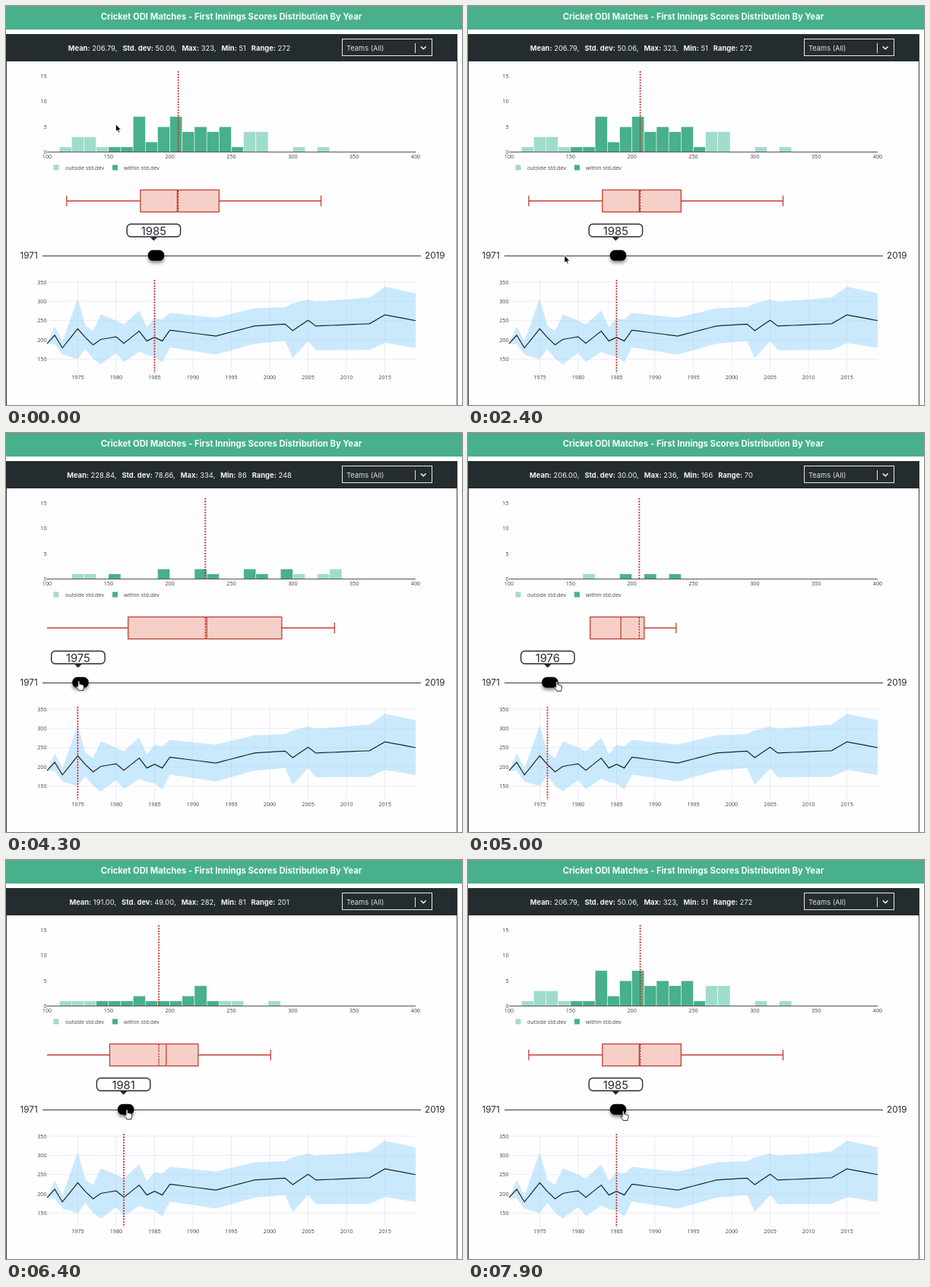
Animation of 600x526 px, one loop 8 s. Source, as an HTML page:

```html
<!DOCTYPE html>
<html lang="en">
<head>
<meta charset="utf-8">
<title>Cricket ODI Matches</title>
<style>
html, body { margin: 0; width: 100%; height: 100%; overflow: hidden; background: #fff; }
svg { display: block; width: 600px; height: 526px; font-family: Inter, Roboto, sans-serif; }
.axis { font: 7.2px "Open Sans", "Noto Sans", sans-serif; fill: #444; }
.mid { text-anchor: middle; }
.end { text-anchor: end; }
.mean { stroke: #c62a22; stroke-width: 1.9; stroke-dasharray: 1.8; }
.box { stroke: #c4402f; stroke-width: 1.3; fill: #f6d0c8; }
</style>
</head>
<body>
<svg viewBox="0 0 600 526">
  <defs>
    <filter id="shadow" x="-50%" y="-50%" width="200%" height="250%">
      <feDropShadow dx="0" dy="3" stdDeviation="2.2" flood-color="#000" flood-opacity=".45"/>
    </filter>
  </defs>
  <g id="fixed"></g>
  <g id="live"></g>
  <g id="cursor">
    <path id="arrow" fill="#000" stroke="#fff" stroke-width=".7" d="M0 0V9.6L2.2 7.6 3.7 11 5.2 10.4 3.8 7.1H6.8Z"/>
    <path id="hand" fill="#fff" stroke="#111" stroke-width=".9" stroke-linejoin="round"
      d="M-1.3 6.5V.8a1.1 1.1 0 0 1 2.2 0V4.2q1.6-.7 2 .4 1.6-.5 1.9.6 1.6-.3 1.6 1.2v2.2q0 1.2-.8 2.2v1.6H-.2q-1.3-2.2-3.3-4.4-.8-1.3.4-1.6.8 0 1.8 1.2z"/>
  </g>
</svg>
<script>
const LOOP = 8000, FIRST = 1971, LAST = 2019, CLICK = 3050, DRAG = 4300;
const GREEN = '#48b08a', PALE = '#a0dccb', INK = '#252c2f';
const $ = id => document.getElementById(id);

// Seasons in full. bars: heights of ten-run bins from 110; box: low whisker and quartiles
const seasons = {
  1975: { mean: 228.84, dev: 78.66, min: 86, max: 334, box: [86, 166, 230, 291], bars: '01101000200210021021012' },
  1978: { mean: 201.3, dev: 65.2, min: 79, max: 313, box: [79, 158, 205.5, 248], bars: '001010100210010010001' },
  1983: { mean: 222.78, dev: 53.56, min: 88, max: 338, box: [88, 182.5, 213.5, 262], bars: '00202438546263142222023' },
  1985: { mean: 206.79, dev: 50.06, min: 51, max: 323, box: [116, 176, 206, 240], bars: '1331117257454514400101' }
};

// Turning points of the long trend: year, mean, deviation
const trend = [[1971, 190, 0], [1972, 212, 23], [1973, 179, 17], [1976, 206, 30], [1977, 187, 36],
  [1980, 208, 42], [1981, 191, 49], [1984, 197, 36], [1986, 197, 56], [1987, 225, 45], [1993, 210, 48],
  [1998, 236, 46], [2002, 241, 44], [2003, 224, 71], [2005, 251, 54], [2006, 236, 63], [2013, 242, 68],
  [2015, 265, 73], [2019, 250, 71],
  ...Object.entries(seasons).map(([year, s]) => [+year, s.mean, s.dev])].sort((a, b) => a[0] - b[0]);

// Pointer path: time, x, y
const path = [[0, 144.5, 156], [2400, 127, 329], [2950, 93.5, 326], [DRAG, 96, 327],
  [7900, 204.5, 331], [LOOP, 204.5, 331]];

const linear = u => u, smooth = u => u * u * (3 - 2 * u);

// Values at a position between rows that start with their own position
function between(rows, at, ease = linear) {
  const i = Math.max(1, rows.findIndex(r => r[0] >= at)), a = rows[i - 1], b = rows[i];
  const u = ease((at - a[0]) / (b[0] - a[0]));
  return a.slice(1).map((v, j) => v + (b[j + 1] - v) * u);
}

const X = v => 54 + (v - 100) * 485 / 300;
const H = n => 192.5 - n * 6.67;
const T = year => 54 + (year - FIRST) * 485 / 48;
const Y = v => 364 + (350 - v) * .5075;
const knob = year => 58.2 + (year - FIRST) * 9.95;

const line = (x1, y1, x2, y2, attrs) => `<line x1="${x1}" y1="${y1}" x2="${x2}" y2="${y2}" ${attrs}/>`;
const rect = (x, y, w, h, attrs) => `<rect x="${x}" y="${y}" width="${w}" height="${h}" ${attrs}/>`;
const text = (x, y, s, attrs) => `<text x="${x}" y="${y}" ${attrs}>${s}</text>`;
const range = (from, to, step = 1) => Array.from({ length: (to - from) / step + 1 }, (_, i) => from + i * step);
const each = (list, draw) => list.map(draw).join('');

// Bell-shaped scores with a seeded wobble; more matches every year
function simulate(year) {
  const [mean, dev] = between(trend, year), n = Math.round(4 + .7 * (year - 1976) ** 2);
  const scores = range(0, n - 1).map(i => {
    const p = (i + .5) / n, wobble = Math.sin(i * 12.9 + year * 7.3) * .25;
    return Math.round(mean + dev * (.56 * Math.log(p / (1 - p)) + wobble));
  }).sort((a, b) => a - b);
  const at = q => scores[Math.floor(q * (n - 1))];
  return {
    mean, dev, min: at(0), max: at(1), box: [0, .25, .5, .75].map(at),
    bars: range(110, 390, 10).map(b => scores.filter(s => s >= b && s < b + 10).length)
  };
}

function drawFixed() {
  const grid = 'stroke="#ececf1"', years = range(FIRST, LAST);
  const edge = side => years.map(y => {
    const [mean, dev] = between(trend, y);
    return `${T(y)},${Y(mean + side * dev)}`;
  });
  $('fixed').innerHTML =
    rect(0, 0, 600, 31, `fill="${GREEN}"`) + rect(0, 0, 600, 1, 'fill="#7a9a8e"') +
    text(296.5, 17.8, 'Cricket ODI Matches - First Innings Scores Distribution By Year',
      'class="mid" font-size="11.25" font-weight="700" fill="#f4fffa"') +
    rect(.5, 37.5, 593, 500, 'fill="#fefdff" stroke="#3c4042"') +
    rect(0, 37, 593.5, 36, `fill="${INK}"`) +
    rect(442.5, 43.5, 118, 22, 'fill="none" stroke="#e8e8e8"') +
    text(448, 58.8, 'Teams (All)', 'font-size="9.3" fill="#dfe1e2"') +
    line(538.5, 49, 538.5, 62, 'stroke="#e0e0e0"') +
    '<path d="M545.8 53.4l3.4 3.4 3.4-3.4" fill="none" stroke="#fff" stroke-width="1.4"/>' +
    each(range(0, 15, 5), n => text(53.5, H(n) + 2.6, n, 'class="axis end"')) +
    each(range(100, 400, 50), v => text(X(v), 201.3, v, 'class="axis mid"')) +
    rect(62.5, 209.5, 7, 7, `fill="${PALE}"`) + text(78, 215.5, 'outside std.dev', 'class="axis"') +
    rect(140, 209.5, 7, 7, `fill="${GREEN}"`) + text(155, 215.5, 'within std.dev', 'class="axis"') +
    line(48, 329.5, 546, 329.5, 'stroke="#33383a"') +
    text(18.5, 333.3, FIRST, `font-size="11.7" fill="${INK}"`) +
    text(551, 333.3, LAST, `font-size="11.7" fill="${INK}"`) +
    each(range(150, 350, 50), v => line(54, Y(v), 539, Y(v), grid) +
      text(53.5, Y(v) + 2.6, v, 'class="axis end"')) +
    each(range(1975, 2015, 5), y => line(T(y), 361, T(y), 484, grid) +
      text(T(y), 492.2, y, 'class="axis mid"')) +
    `<polygon points="${[...edge(1), ...edge(-1).reverse()].join(' ')}" fill="rgb(135,206,250)" fill-opacity=".43"/>` +
    `<polyline points="${edge(0).join(' ')}" fill="none" stroke="#1c2529" stroke-width="1.2"/>`;
}

function drawYear(year) {
  const { mean, dev, min, max, box, bars } = seasons[year] || simulate(year);
  const [low, q1, median, q3] = box.map(X), top = X(max), left = Math.max(54, low), mx = X(mean);
  const stats = [['Mean', mean.toFixed(2) + ','], ['Std. dev', dev.toFixed(2) + ','],
    ['Max', max + ','], ['Min', min], ['Range', max - min]];
  const k = knob(year), tip = k - 3.1;
  $('live').innerHTML =
    `<text x="228" y="58.8" class="mid" font-size="9.4" fill="#f2f3f3">` +
    each(stats, ([name, value], i) =>
      `<tspan font-weight="700" dx="${i ? 7 : 0}">${name}:</tspan><tspan> ${value}</tspan>`) + '</text>' +
    each([...bars], (n, i) => {
      const bin = 110 + i * 10, inside = bin + 10 > mean - dev && bin < mean + dev * .9;
      return +n ? rect(X(bin), H(n), 16.17, n * 6.67,
        `fill="${inside ? GREEN : PALE}" stroke="#fff" stroke-width=".5"`) : '';
    }) +
    line(54, 192.5, 539, 192.5, 'stroke="#555"') +
    line(mx, 86, mx, 192, 'class="mean"') +
    line(left, 257, q1, 257, 'class="box"') + line(q3, 257, top, 257, 'class="box"') +
    (low > 54 ? line(low, 250, low, 264, 'class="box"') : '') +
    line(top, 250, top, 264, 'class="box"') +
    rect(q1, 242.5, q3 - q1, 29, 'class="box"') +
    line(median, 242.5, median, 271.5, 'class="box"') +
    line(mx, 243, mx, 271, 'stroke="#b8281e" stroke-width="1.2" stroke-dasharray="2.4 1.4"') +
    rect(tip - 35.2, 287.5, 70.4, 16.8, `rx="5" fill="#fff" stroke="${INK}" stroke-width="1.4"`) +
    `<path d="M${tip - 5} 304.5h10l-5 5z" fill="${INK}"/>` +
    text(tip, 302, year, `class="mid" font-size="14.8" fill="${INK}"`) +
    rect(k - 10.7, 321.8, 21.4, 14, 'rx="6.5" fill="#000" filter="url(#shadow)"') +
    line(T(year), 361, T(year), 484, 'class="mean"');
}

let shown;
function frame(now) {
  const t = now % LOOP, [x, y] = between(path, t, t < DRAG ? smooth : linear);
  const dragged = FIRST + Math.round((x - 64.7) / 9.95);
  const year = t < CLICK ? 1985 : Math.max(1975, dragged);
  if (year !== shown) drawYear(shown = year);
  $('cursor').setAttribute('transform', `translate(${x} ${y})`);
  $('arrow').style.display = t < 2900 ? '' : 'none';
  $('hand').style.display = t < 2900 ? 'none' : '';
  requestAnimationFrame(frame);
}

drawFixed();
requestAnimationFrame(frame);
</script>
</body>
</html>
```
